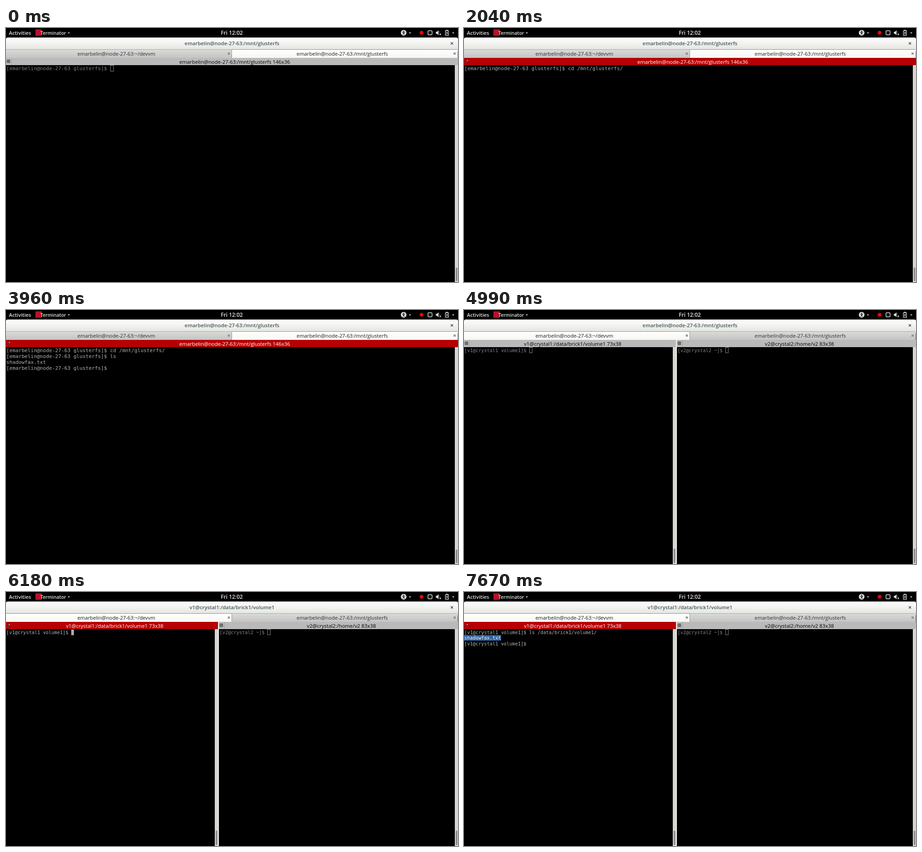
An HTML page with a canvas that plays this animation: 998 by 561 pixels, repeating every 8 s.

```html
<!DOCTYPE html>
<html lang="en">
<head>
<meta charset="utf-8">
<title>Terminal session</title>
<style>
  html, body { margin: 0; width: 100%; height: 100%; overflow: hidden; background: #000; }
  canvas { display: block; width: 998px; height: 561px; }
</style>
</head>
<body>
<canvas id="stage" width="998" height="561"></canvas>
<script>
const ctx = document.getElementById('stage').getContext('2d');
const LOOP = 8000;
const UI = '"Open Sans", "Noto Sans", sans-serif';
const MONO = '"DejaVu Sans Mono", monospace';

const HOST = 'emarbelin@node-27-63';
const LEFT_TAB = HOST + ':~/devvm';
const RIGHT_TAB = HOST + ':/mnt/glusterfs';
const BRICK = 'v1@crystal1:/data/brick1/volume1';
const PS = '[' + HOST + ' glusterfs]$ ';
const PS1 = '[v1@crystal1 volume1]$ ';
const PS2 = '[v2@crystal2 ~]$ ';
const CD = PS + 'cd /mnt/glusterfs/';
const LS = PS1 + 'ls /data/brick1/volume1/';
const FILE = 'shadowfax.txt';

// Each step: start time, tab, cursor style, terminal lines.
// A key press lights the cursor at once; its echo follows with the next repaint.
const steps = [
  [0, 1, 'hollow', [PS]],
  [110, 1, 'solid', [PS]],
  [710, 1, 'solid', [PS + 'clear']],
  [830, 1, 'solid', [PS]],
  [1400, 1, 'off', [PS + 'clear']],
  [1470, 1, 'solid', [PS + 'clear']],
  [2040, 1, 'off', [CD]],
  [2290, 1, 'solid', [CD]],
  [2320, 1, 'solid', [CD, PS]],
  [2880, 1, 'off', [CD, PS]],
  [3210, 1, 'solid', [CD, PS]],
  [3290, 1, 'solid', [CD, PS + 'l']],
  [3370, 1, 'solid', [CD, PS + 'ls']],
  [3960, 1, 'off', [CD, PS + 'ls', FILE, PS]],
  [4560, 1, 'solid', [CD, PS + 'ls', FILE, PS]],
  [4990, 0, 'hollow', [PS1]],
  [5040, 0, 'solid', [PS1]],
  [5580, 0, 'off', [PS1]],
  [6180, 0, 'solid', [PS1]],
  [6240, 0, 'solid', [PS1 + 'clear']],
  [6480, 0, 'solid', [LS]],
  [7050, 0, 'off', [LS]],
  [7080, 0, 'solid', [LS]],
  [7670, 0, 'off', [LS, FILE, PS1]]
];

function rect(x, y, w, h, fill) {
  ctx.fillStyle = fill;
  ctx.fillRect(x, y, w, h);
}

function shade(x, y, w, h, top, bottom) {
  const g = ctx.createLinearGradient(0, y, 0, y + h);
  g.addColorStop(0, top);
  g.addColorStop(1, bottom);
  rect(x, y, w, h, g);
}

function label(text, x, y, color, size = 11.2, weight = 400, align = 'center') {
  ctx.font = `${weight} ${size}px ${UI}`;
  ctx.textAlign = align;
  ctx.fillStyle = color;
  ctx.fillText(text, x, y);
}

function poly(points, fill) {
  ctx.beginPath();
  points.forEach(([x, y]) => ctx.lineTo(x, y));
  ctx.fillStyle = fill;
  ctx.fill();
}

function line(points, color, width = 1) {
  ctx.beginPath();
  points.forEach(([x, y], i) => i % 2 ? ctx.lineTo(x, y) : ctx.moveTo(x, y));
  ctx.strokeStyle = color;
  ctx.lineWidth = width;
  ctx.stroke();
}

function disc(x, y, r, fill) {
  ctx.beginPath();
  ctx.arc(x, y, r, 0, Math.PI * 2);
  ctx.fillStyle = fill;
  ctx.fill();
}

const cross = (x, y, r, color, width) =>
  line([[x - r, y - r], [x + r, y + r], [x + r, y - r], [x - r, y + r]], color, width);

const caret = x => poly([[x - 2.5, 9.7], [x + 2.5, 9.7], [x, 12.4]], '#ddd');

function topBar() {
  rect(0, 0, 998, 22, '#000');
  label('Activities', 6.5, 15, '#e4e4e4', 11.2, 600, 'left');
  rect(65, 3, 14, 14, '#b01528');
  label('Terminator', 76, 15, '#e4e4e4', 10.5, 600, 'left');
  caret(138.7);
  label('Fri 12:02', 498.5, 15, '#e4e4e4', 12, 600);

  disc(878, 10.5, 6.2, '#e4e4e4');
  disc(878, 7.2, 1.1, '#000');
  line([[874.5, 9.3], [881.5, 9.3], [878, 9], [878, 11.5],
    [878, 11], [876, 14.5], [878, 11], [880, 14.5]], '#000', 1.2);
  caret(892);
  disc(917.5, 10.5, 4.2, '#f00010');
  ctx.strokeStyle = '#ddd';
  ctx.lineWidth = 1.5;
  ctx.beginPath();
  ctx.roundRect(931.7, 6, 9, 9, 2);
  ctx.stroke();
  poly([[949, 8.5], [951.5, 8.5], [955, 5], [955, 16], [951.5, 12.5], [949, 12.5]], '#ddd');
  line([[957, 6.5], [957, 11]], '#777');
  cross(958.8, 14, 1.6, '#ddd', 1.2);
  ctx.lineWidth = 1.3;
  ctx.strokeStyle = '#ddd';
  ctx.strokeRect(970.2, 6, 6.8, 10);
  rect(972, 4, 3, 2, '#ddd');
  poly([[974.7, 7], [971.5, 11.5], [973.4, 11.5], [972.6, 15], [976, 10.3], [974, 10.3]], '#ddd');
  caret(987.5);
}

function tab(x, w, text, center, active) {
  if (active) shade(x, 47, w, 19, '#ffffff', '#f6f7f2');
  else shade(x, 48, w, 18, '#dadad8', '#c4c4c4');
  rect(x, 47, w, 1, active ? '#7d919c' : '#a9aaa7');
  label(text, center, 61, active ? '#1c1c1c' : '#2c2e2e', 11.25);
  cross(x + w - 7, 56.5, 2.2, '#858784', 1.8);
}

function windowBars(current, title) {
  ctx.beginPath();
  ctx.roundRect(0, 21, 998, 30, [4, 4, 0, 0]);
  const g = ctx.createLinearGradient(0, 21, 0, 47);
  g.addColorStop(0, '#ffffff');
  g.addColorStop(1, '#e5e6e1');
  ctx.fillStyle = g;
  ctx.fill();
  label(title, 499, 38, '#43585a', 11.35, 600);
  cross(984.5, 34, 2.5, '#444', 1.3);
  tab(0, 499, LEFT_TAB, 243.5, current === 0);
  tab(499, 498.5, RIGHT_TAB, 742.5, current === 1);
  rect(498, 48, 1, 18, '#999');
}

function header(x, w, text, center, focused) {
  rect(x, 66, w, 16, focused ? '#b70003' : '#bababa');
  label(text, center, 78.5, focused ? '#fff' : '#000', 11.35);
  if (focused) {
    rect(x + 2, 73, 3, 4, '#000');
    rect(x + 5, 71, 3, 3, '#111');
    rect(x + 3, 74, 2, 2, '#45b0bc');
    rect(x + 6, 71, 2, 2, '#d8e4dc');
  } else {
    ctx.strokeStyle = '#333';
    ctx.lineWidth = 1;
    ctx.strokeRect(x + 2.5, 70.5, 6, 6);
    line([[x + 2, 73.5], [x + 8, 73.5], [x + 5.5, 70], [x + 5.5, 77]], '#333');
    rect(x + 12, 66, 1, 16, '#a2a2a2');
  }
}

function scrollbar(x, w, top) {
  rect(x, 82, w, 479, '#d5d5d2');
  ctx.beginPath();
  ctx.roundRect(x + 2, top, 3.6, 559 - top, 1.8);
  ctx.fillStyle = '#898b88';
  ctx.fill();
}

function terminal(x, size, lead, lines, cursor, marked) {
  const dim = cursor === 'hollow';
  const advance = size * 0.602;
  ctx.textAlign = 'left';
  ctx.font = `${size}px ${MONO}`;
  lines.forEach((text, i) => {
    const hit = marked && text === FILE;
    if (hit) rect(x - 1, 82.7 + i * lead, text.length * advance + 1.2, lead, '#3465a4');
    ctx.fillStyle = hit ? '#f4f4f4' : dim ? '#858585' : '#b2b2b2';
    ctx.fillText(text, x, 93 + i * lead);
  });
  if (cursor === 'off') return;
  const row = lines.length - 1;
  const cx = Math.round(x + lines[row].length * advance);
  const cy = Math.round(82.6 + row * lead);
  if (dim) {
    ctx.strokeStyle = '#858585';
    ctx.lineWidth = 1;
    ctx.strokeRect(cx + 0.5, cy - 0.5, Math.round(advance), Math.round(lead));
  } else {
    rect(cx, cy, Math.round(advance), lead, '#acacac');
  }
}

function draw(now) {
  const t = now % LOOP;
  const [, current, cursor, lines] = steps.filter(s => s[0] <= t).pop();
  const focused = cursor !== 'hollow';
  rect(0, 0, 998, 561, '#000');
  topBar();
  windowBars(current, current || !focused ? RIGHT_TAB : BRICK);
  if (current) {
    header(0, 998, RIGHT_TAB + ' 146x36', 505, focused);
    terminal(0.7, 11.2, 13, lines, cursor);
  } else {
    header(0, 468, BRICK + ' 73x38', 240, focused);
    header(470, 528, 'v2@crystal2:/home/v2 83x38', 740.5, false);
    terminal(0.8, 10.33, 12.4, lines, cursor, true);
    terminal(471.5, 10.33, 12.4, [PS2], 'hollow');
    scrollbar(461, 7, 527);
    rect(468, 66, 2, 495, '#f1f1ef');
  }
  scrollbar(991, 7, current ? 529 : 527);
}

const origin = performance.now();
function tick() {
  draw(performance.now() - origin);
  requestAnimationFrame(tick);
}
tick();
</script>
</body>
</html>
```
